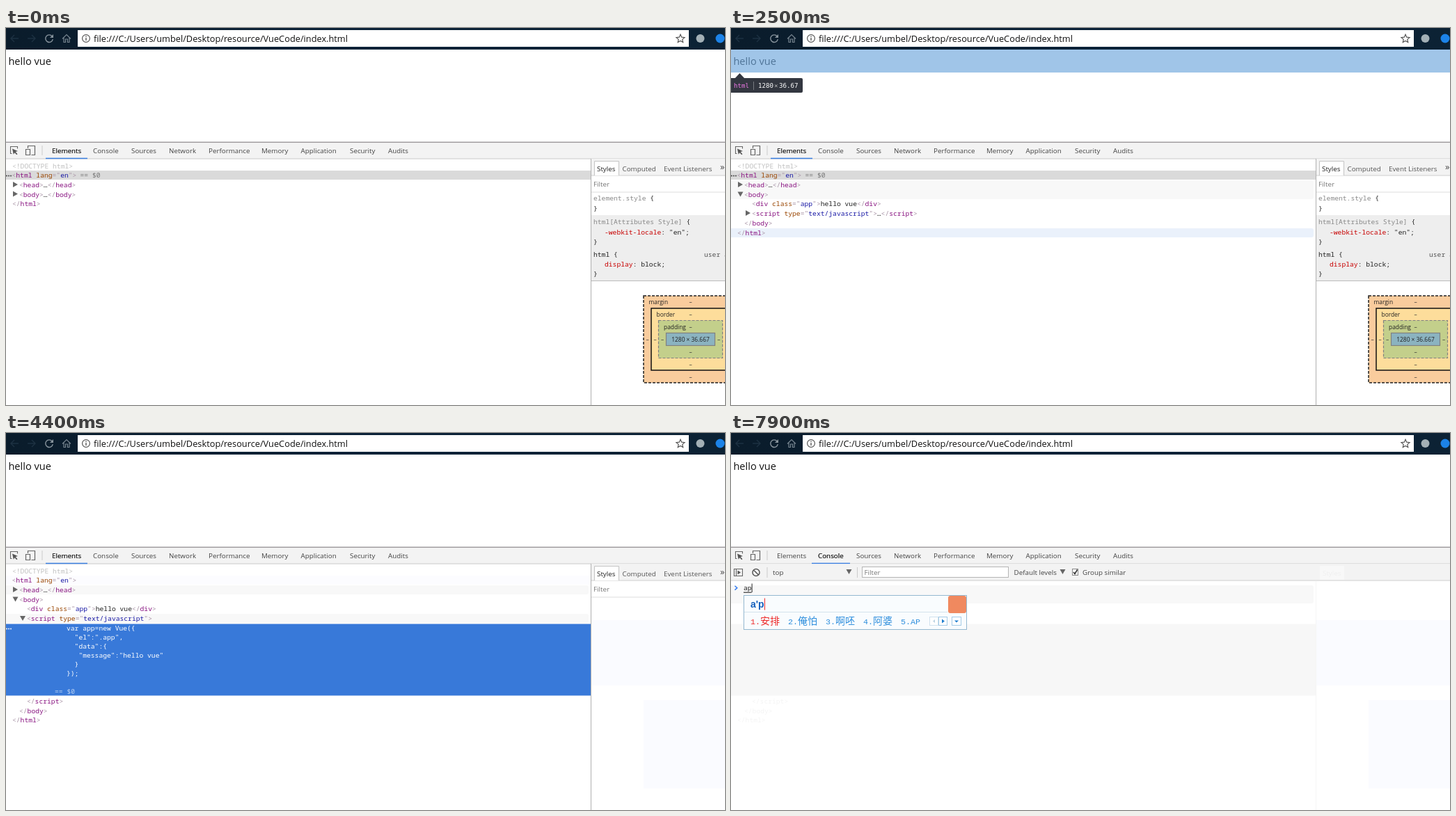
Animation, 1033 px wide and 542 px high, one loop 8 s. Source, as an HTML page:

```html
<!DOCTYPE html>
<html lang="en">
<head>
<meta charset="utf-8">
<style>
  html, body { margin: 0; width: 100%; height: 100%; overflow: hidden; background: #fff; }
  svg { display: block; width: 100%; height: 100%; }
  text { white-space: pre; }
  .ui { font: 9.82px "Open Sans", sans-serif; }
  .code { font: 9.68px "Noto Sans Mono", monospace; }
  .box { font: 8.4px "Open Sans", sans-serif; }
  .tip { font: 9.1px "DejaVu Sans Mono", monospace; }
  .url { font: 12.79px "Open Sans", sans-serif; }
  .page { font: 14.58px "Open Sans", sans-serif; }
  .num { font: 11.67px "Liberation Mono", monospace; }
  .han { font: 14px "Noto Sans CJK SC", "Noto Sans CJK", sans-serif; }
  .pin { font: bold 14px "Liberation Sans", sans-serif; }
</style>
</head>
<body>
<svg id="stage" viewBox="0 0 1033 542" xmlns="http://www.w3.org/2000/svg"></svg>
<script>
const LOOP = 8000;
const stage = document.getElementById('stage');
const parts = [];

// Adds a group shown during the given [from, to] pairs; without pairs it always shows.
function part(markup, ...spans) {
  const g = document.createElementNS(stage.namespaceURI, 'g');
  g.innerHTML = markup;
  stage.append(g);
  if (spans.length) parts.push({ g, spans });
}

const esc = s => s.replace(/&/g, '&amp;').replace(/</g, '&lt;').replace(/>/g, '&gt;');
const rect = (x, y, w, h, fill, more = '') =>
  `<rect x="${x}" y="${y}" width="${w}" height="${h}" fill="${fill}" ${more}/>`;
const path = (d, stroke, width = 1, fill = 'none') =>
  `<path d="${d}" stroke="${stroke}" stroke-width="${width}" fill="${fill}"/>`;
const shape = (d, fill) => `<path d="${d}" fill="${fill}"/>`;
const text = (cls, x, y, s, fill = '#222', more = '') =>
  `<text class="${cls}" x="${x}" y="${y}" fill="${fill}" ${more}>${esc(s)}</text>`;
const rich = (x, y, runs) => `<text class="code" x="${x}" y="${y}">` +
  runs.map(([s, c]) => `<tspan fill="${c}">${esc(s)}</tspan>`).join('') + '</text>';

const MARK = '#a894a6', TAG = '#881280', ATTR = '#994500', VALUE = '#1a1aa6';
const open = (name, attr, value) => [['<', MARK], [name, TAG],
  ...(attr ? [[' ' + attr, ATTR], ['="', MARK], [value, VALUE], ['"', MARK]] : []), ['>', MARK]];
const close = name => [['</', MARK], [name, TAG], ['>', MARK]];
const plain = s => [[s, '#222']];
const right = (x, y) => shape(`M${x - 3} ${y - 4}L${x + 4} ${y}L${x - 3} ${y + 4}Z`, '#666');
const down = (x, y) => shape(`M${x - 4} ${y - 3}H${x + 4}L${x} ${y + 4}Z`, '#666');
const band = (y, h, fill) => shape(`M0 ${y}H834q3 0 3 3v${h - 6}q0 3 -3 3H0Z`, fill);
const HOVER = '#eaf1fb', FADED = '#f8f8f8';

// Browser bar
part(`<defs><linearGradient id="bar"><stop stop-color="#0a1c2b"/>
  <stop offset=".5" stop-color="#0b2238"/><stop offset="1" stop-color="#0c2234"/></linearGradient></defs>` +
  rect(0, 0, 1033, 542, '#fff') + rect(0, 0, 1033, 31, 'url(#bar)') +
  rect(103, 3, 878, 24, '#fff') +
  path('M18 15H7M12 10L7 15L12 20M31 15H42M37 10L42 15L37 20', '#1d3142', 1.4) +
  path('M66.2 11.8A5.3 5.3 0 1 0 67.3 16.2', '#87939c', 1.4) +
  shape('M68 9V14H63Z', '#87939c') +
  path('M81 15.5L87 9.5L93 15.5M83 14V20.5H85.5V16H88.5V20.5H91V14', '#75838e', 1.2) +
  '<circle cx="115" cy="15" r="5.4" fill="none" stroke="#555" stroke-width="1.2"/>' +
  rect(114.3, 14, 1.4, 4, '#555') + rect(114.3, 11.6, 1.4, 1.4, '#555') +
  text('url', 126, 19.5, 'file:///C:/Users/umbel/Desktop/resource/VueCode/index.html', '#111') +
  path('M969 9.3L970.7 13.2L975 13.6L971.8 16.4L972.7 20.6L969 18.4L965.3 20.6L966.2 16.4L963 13.6L967.3 13.2Z', '#555', 1.2) +
  '<circle cx="997.5" cy="15" r="6" fill="#a3b0b6"/><circle cx="1026" cy="15" r="6.5" fill="#1c83e8"/>' +
  text('page', 3.4, 53, 'hello vue', '#111'));

// Page highlights
const BLUE = 'rgba(111,168,220,.66)', SAND = 'rgba(246,178,107,.66)';
const tip = (name, w, h) => rect(-3, 72, 106, 21, '#333740', 'rx="2"') +
  shape('M5.5 72.5L12.5 65L19.5 72.5Z', '#333740') +
  text('tip', 4, 86, name, '#ee78e6', 'font-weight="bold"') + rect(32, 77, 1, 12, '#777a80') +
  text('tip', 39, 86, w, '#fff') + text('tip', 62, 86, '×', '#bbb') + text('tip', 69, 86, h, '#fff');
part(rect(0, 31, 1033, 33, BLUE) + tip('html', '1280', '36.67'),
  [900, 1000], [1200, 1400], [2500, 2600]);
part(`<path fill-rule="evenodd" fill="${SAND}" d="M0 31H1033V64H0ZM3.5 38.5H1033V57H3.5Z"/>` +
  rect(3.5, 38.5, 1030, 18.5, BLUE) + tip('body', '1264', '20.67'),
  [1100, 1200], [1400, 2500], [2600, 2700], [4700, 4800]);

// Tab bar
const tabs = [['Elements', 66], ['Console', 125], ['Sources', 180], ['Network', 234], ['Performance', 291],
  ['Memory', 367], ['Application', 423.5], ['Security', 494], ['Audits', 549]];
part(rect(0, 164, 1033, 24, '#f3f3f3') + rect(0, 163.5, 1033, 1.5, '#a09c9f') + rect(0, 187.5, 1033, 1, '#c9c9c9'));
part(rect(58, 165, 59, 22, '#e7e7e7'), [600, 900]);
part(rect(116, 165, 55, 22, '#e7e7e7'), [4800, 5500]);
part(tabs.map(([s, x]) => text('ui', x, 180, s, '#444')).join('') +
  path('M8.5 180.5H6.5V170.5H16.5V173.5', '#666', 1.1) +
  shape('M9 173.5L17 177L13.7 178.1L16.5 181.2L15.2 182.3L12.5 179.2L10.8 181.8Z', '#555') +
  path('M31.5 173V169.5H41.5V182.5H36.5', '#666', 1.2) + path('M28.5 174.5H34.5V182.5H28.5Z', '#666', 1.2, '#f3f3f3') +
  rect(51.5, 169, 1, 14, '#ccc'));
const slider = (x, w) => rect(x, 186.7, w, 1.5, '#3b7fe0');
part(text('ui', 66, 180, 'Elements', '#222') + slider(57, 60), [0, 5400]);
part(slider(105, 55), [5400, 5500]);
part(text('ui', 125, 180, 'Console', '#222') + slider(116, 55), [5500, LOOP]);

// Element tree: row backgrounds
part(rect(0, 205, 840, 13, '#dadada') + text('code', 106.5, 215.2, '== $0', '#777', 'font-style="italic"') +
  [1, 4, 7].map(x => `<circle cx="${x}" cy="212.5" r=".9" fill="#333"/>`).join(''), [0, 4400]);
part(rect(0, 205, 840, 13, '#fcfcff'), [4400, 5400]);
part(band(219, 13, HOVER), [1000, 1100]);
part(band(233, 13, HOVER), [1100, 1200], [1400, 2400], [4700, 4800]);
part(band(246, 13, HOVER), [1200, 1400]);
part(band(274, 13, HOVER), [2400, 2500], [2600, 2700]);
part(band(288, 13, HOVER), [2500, 2600]);
part(band(219, 27, FADED), [2400, 2700]);
part(band(219, 13, FADED) + band(260, 13.5, FADED), [2700, 5400]);
part(band(274.5, 103, HOVER), [3700, 4400]);
part(rect(0, 274.5, 840, 103, '#3879d9'), [4400, 5400]);

// Element tree: markup
part(text('code', 9, 201.5, '<!DOCTYPE html>', '#c0c0c0') + rich(8.5, 215.2, open('html', 'lang', 'en')) +
  right(13, 225) + rich(19, 229, [...open('head'), ...plain('…'), ...close('head')]), [0, 5400]);
part(right(13, 238.5) + rich(19, 242.7, [...open('body'), ...plain('…'), ...close('body')]) +
  rich(9, 256.4, close('html')), [0, 2000]);
part(down(13.5, 238.5) + rich(19, 242.7, open('body')) +
  rich(30, 256.4, [...open('div', 'class', 'app'), ...plain('hello vue'), ...close('div')]) +
  rich(30, 270.2, open('script', 'type', 'text/javascript')), [2000, 5400]);
part(right(24, 266) + rich(209.8, 270.2, [...plain('…'), ...close('script')]) +
  rich(19, 284, close('body')) + rich(9, 297.7, close('html')), [2000, 3500]);
const tail = [[30, 388.5, 'script'], [19, 402.5, 'body'], [9, 416.2, 'html']];
part(down(24, 266) + tail.map(([x, y, name]) => rich(x, y, close(name))).join(''), [3500, 5400]);
const code = ['var app=new Vue({', '  "el":".app",', '  "data":{', '   "message":"hello vue"', '  }', '});'];
const script = fill => code.map((s, i) => text('code', 87, 284.2 + i * 13.05, s, fill)).join('');
part(script('#222'), [3500, 4400]);
part(script('#fff') + text('code', 70, 374.8, '== $0', '#b9d0f2', 'font-style="italic"') +
  [1, 4, 7].map(x => `<circle cx="${x}" cy="281.5" r=".9" fill="#fff"/>`).join(''), [4400, 5400]);

// Styles pane
const pale = rect(841, 269, 192, 94, '#fafbff') + rect(916, 384, 117, 127, '#fafbff');
part(rect(841, 188.5, 192, 354, '#fff') + rect(841, 188.5, 192, 23, '#f3f3f3') + rect(841, 211.5, 192, 1, '#ccc') +
  path('M845.5 212V191.5H880.5V212', '#c4c4c4', 1, '#fff') +
  text('ui', 849, 205.7, 'Styles') + text('ui', 885.5, 205.7, 'Computed', '#555') +
  text('ui', 945, 205.7, 'Event Listeners', '#555') + text('ui', 1026, 204, '»', '#444', 'style="font-size:13px"') +
  text('ui', 844, 228, 'Filter', '#777') + rect(841, 235.5, 192, 1, '#ddd') +
  rect(840, 188, 1, 354, '#b0b0b0'), [0, 5400]);
const dash = (x, y) => text('box', x, y + 3, '–', '#333', 'text-anchor="middle"');
const frame = (x, y, w, h, fill, line, width, gap) =>
  rect(x, y, w, h, fill, `stroke="${line}" stroke-width="${width}"` + (gap ? ` stroke-dasharray="${gap}"` : ''));
const GREY = '#888', RED = '#c80000', INK = '#222';
part(rect(841, 269, 192, 94, '#eee') + rect(841, 363, 192, 1, '#bbb') +
  rich(844, 248, [['element.style', GREY], [' {', INK]]) + rich(844, 262.5, plain('}')) +
  rich(844, 282, [['html[Attributes Style]', GREY], [' {', INK]]) +
  rich(860, 296.5, [['-webkit-locale', RED], [': "en";', INK]]) + rich(844, 310.5, plain('}')) +
  rich(844, 328.5, plain('html {')) + rich(1003, 328.5, [['user agent stylesheet', '#555']]) +
  rich(860, 343, [['display', RED], [': block;', INK]]) + rich(844, 356.5, plain('}')) +
  frame(916, 385, 135, 125, '#f9cc9d', '#222', 1.5, '4 2') +
  frame(927, 403, 113, 89, '#fddd9b', '#111', 1.5) +
  frame(937.5, 420.5, 92, 54, '#c3cf8b', '#808080', 1.2, '4 2') +
  frame(948.5, 438.5, 70, 18, '#8bb3c0', '#808080', 1.2) +
  text('box', 923.5, 397, 'margin') + text('box', 934.5, 415, 'border') + text('box', 945, 433, 'padding') +
  text('box', 983.5, 451, '1280 × 36.667', '#222', 'text-anchor="middle"') +
  [394, 412, 430, 466, 483.5, 502].map(y => dash(983.5, y)).join('') +
  [921.5, 932.5, 943, 1024].map(x => dash(x, 448)).join(''), [0, 4400]);
part(pale, [4400, 5400]);

// Console
const SOFT = '#f4f4f4';
part(rect(0, 188.5, 1033, 354, '#fff') + rect(0, 188.5, 1033, 23, '#f3f3f3') + rect(0, 211.5, 1033, 1, '#ccc') +
  rect(846, 191, 35, 20, '#f8f8f8') + text('ui', 850, 205, 'Styles', '#efefef') +
  band(219, 26, FADED) + rect(0, 274.5, 840, 103, '#f7f7f7') + rect(840, 213, 1, 329, '#f5f5f5') + pale +
  text('code', 30, 256.4, '<div class="app">hello vue</div>', SOFT) +
  text('code', 30, 270.2, '<script type="text/javascript">', SOFT) +
  tail.map(([x, y, name]) => text('code', x, y, `</${name}>`, SOFT)).join('') +
  path('M4.5 195.5H16.5V205.5H4.5ZM7.5 195.5V205.5', '#666', 1.1) + shape('M9.5 197.5L14 200.5L9.5 203.5Z', '#555') +
  path('M31 200.5A5 5 0 1 0 41 200.5A5 5 0 1 0 31 200.5M32.5 197L39.5 204', '#555', 1.5) +
  rect(51.5, 193, 1, 15, '#ccc') + text('ui', 60, 204, 'top', '#444') + down(169.5, 199) +
  rect(181, 193, 1, 15, '#ccc') + frame(188.5, 192.5, 210, 15, '#fff', '#b5b5b5', 1) +
  text('ui', 191.5, 204, 'Filter', '#777') + text('ui', 406.5, 204, 'Default levels', '#444') + down(476.5, 199) +
  frame(490.5, 195.5, 8, 9, '#fff', '#888', 1) + path('M492 200L494 202.5L497.5 196.5', '#333', 1.6) +
  text('ui', 505, 204, 'Group similar', '#444') +
  path('M5.5 219.8L8.8 222.7L5.5 225.6', '#367cf1', 1.5), [5400, LOOP]);
part(rect(17.5, 216, 1, 13, '#222'), [5500, 5900], [6400, 6900], [7400, 7600]);

// Typing and candidate window
const typed = s => {
  const w = s.length * 5.81;
  return text('code', 18, 226.3, s) + rect(18, 228.6, w, 1.1, '#222') + rect(18 + w, 216.5, 1, 12.5, '#222');
};
function picker(pinyin, caret, words, step, end) {
  const LINE = '#a4cbe6', b = end - 54;
  const tri = (d, fill) => shape(d, fill);
  return frame(18.5, 233.5, end - 19, 49, '#f9fcfe', '#94b8d0', 1) + rect(19, 257, end - 47, 1, '#d5e3ec') +
    rect(end - 27, 234, 26, 25, '#f0895f', 'rx="3"') +
    text('pin', 28, 251, pinyin, '#1560bd') + rect(caret, 237.5, 1, 17, '#f03030') +
    words.map((w, i) => {
      const x = 28 + i * step, fill = i ? '#2f8fdd' : '#ee2a2a';
      return text('num', x, 274.5, i + 1 + '.', fill) + text(w === 'AP' ? 'num' : 'han', x + 14, 274.5, w, fill);
    }).join('') +
    frame(b + .5, 264.5, 12, 12, '#fff', '#d0e2ee', 1) + frame(b + 13.5, 264.5, 12, 12, '#fff', LINE, 1) +
    frame(b + 32.5, 264.5, 13, 12, '#fff', LINE, 1) +
    tri(`M${b + 8} 268V273L${b + 5} 270.5Z`, '#bcd3e2') + tri(`M${b + 18} 267.5V273.5L${b + 22} 270.5Z`, '#1f7fcf') +
    tri(`M${b + 36} 269.5H${b + 42}L${b + 39} 272.5Z`, '#1f7fcf');
}
part(typed('a'), [7600, 7900]);
part(picker('a', 36.5, ['啊', '阿', '吖', '呵', '嗄'], 40, 283), [7700, 7900]);
part(typed('ap') + picker("a'p", 48, ['安排', '俺怕', '啊呸', '阿婆', 'AP'], 54, 339), [7900, LOOP]);

const start = performance.now();
function draw() {
  const t = (performance.now() - start) % LOOP;
  for (const { g, spans } of parts)
    g.style.display = spans.some(([a, b]) => t >= a && t < b) ? '' : 'none';
  requestAnimationFrame(draw);
}
draw();
</script>
</body>
</html>
```
